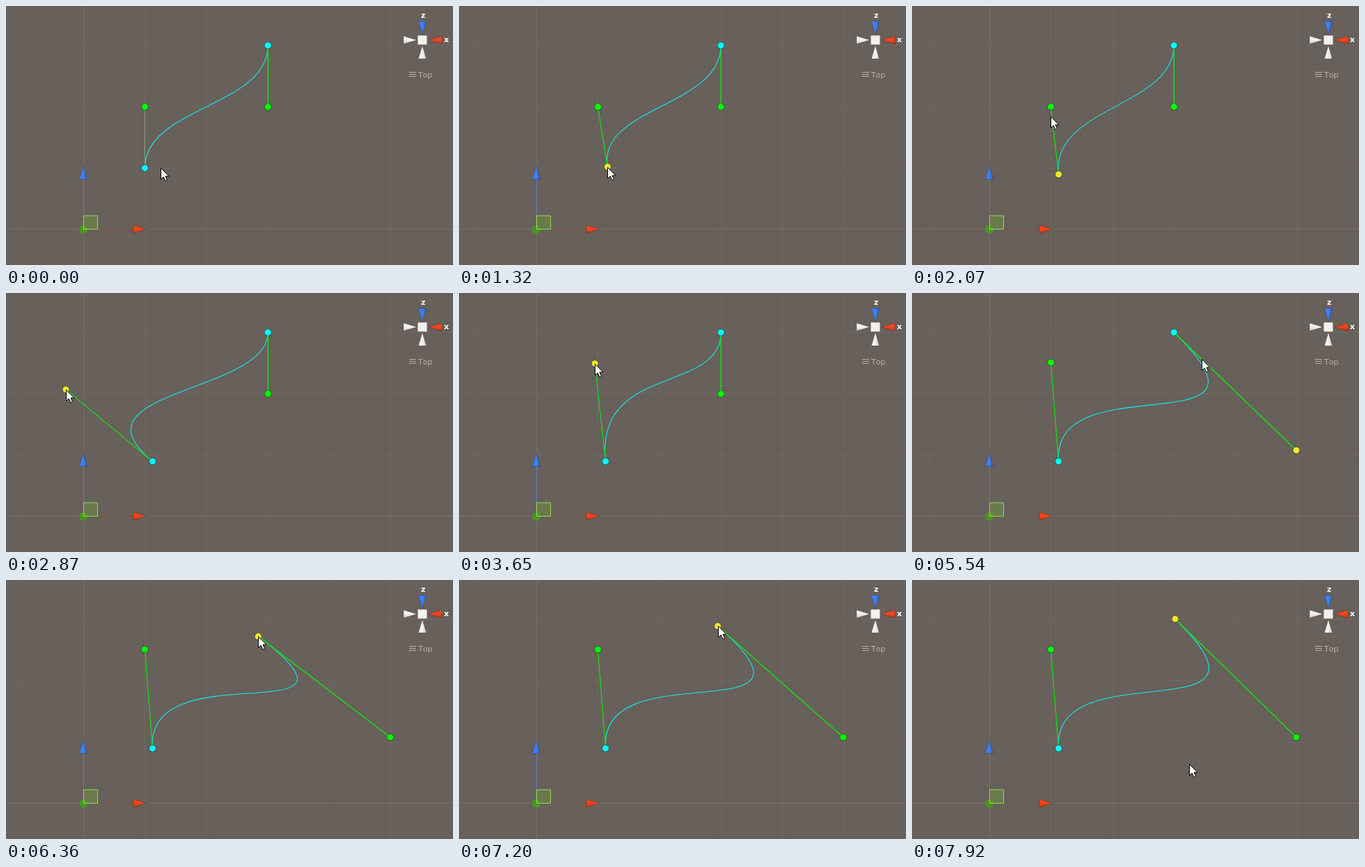
Recreate the animation shown at these times as an HTML page with a canvas. Size 642 by 373 pixels, loop 8 s.

```html
<!DOCTYPE html>
<html>
<head>
<meta charset="utf-8">
<style>
html, body { margin: 0; width: 100%; height: 100%; overflow: hidden; background: #68605a; }
canvas { display: block; }
</style>
</head>
<body>
<canvas id="stage" width="642" height="373"></canvas>
<script>
const ctx = document.getElementById('stage').getContext('2d');
const LOOP = 8000, STEP = 72, CELL = 88.4, ORIGIN = [111, 321];
const SANS = '"DejaVu Sans", sans-serif';

// The pointer travels to each place in turn, dragging a point where one is named
const moves = [
  { start: 60, end: 330, to: [201, 234] },
  { start: 560, end: 780, to: [215, 225], drag: 'a' },
  { start: 1320, end: 1700, to: [210.5, 242.5], drag: 'a' },
  { start: 1850, end: 2290, to: [198, 149] },
  { start: 2450, end: 2870, to: [86, 139], drag: 'aHandle' },
  { start: 3350, end: 3780, to: [199.5, 100], drag: 'aHandle' },
  { start: 3860, end: 4150, to: [344, 129] },
  { start: 4230, end: 4450, to: [361, 136] },
  { start: 4590, end: 5110, to: [552, 226.5], drag: 'bHandle' },
  { start: 5180, end: 5340, to: [483, 171] },
  { start: 5400, end: 5980, to: [380, 55] },
  { start: 6140, end: 6640, to: [359.5, 86], drag: 'b' },
  { start: 7120, end: 7480, to: [378, 56], drag: 'b' },
  { start: 7640, end: 7920, to: [398, 265] }
];

const easeOut = p => 1 - (1 - p) ** 2.6;

// Share of a move done at time t, in whole steps
function stepped(t, start, end) {
  const gaps = Math.round((end - start) / STEP);
  const done = Math.floor((t - start) / (end - start) * gaps + 0.15) + 1;
  return Math.min(1, done / (gaps + 1));
}

function stateAt(t) {
  const s = {
    a: [199.5, 233.3], aHandle: [199.5, 145.2],
    bHandle: [376.3, 145.2], b: [376.2, 56.8],
    cursor: [222, 233], picked: null
  };
  for (const { start, end, to, drag } of moves) {
    if (t < start) break;
    const k = easeOut(stepped(t, start, end));
    s.cursor = s[drag || 'cursor'].map((v, i) => v + (to[i] - v) * k);
    if (drag) {
      s[drag] = s.cursor;
      s.picked = drag;
    }
  }
  return s;
}

function line(a, b, color, width = 1) {
  ctx.strokeStyle = color;
  ctx.lineWidth = width;
  ctx.beginPath();
  ctx.moveTo(...a);
  ctx.lineTo(...b);
  ctx.stroke();
}

function poly(pts, fill, stroke, width = 1) {
  ctx.beginPath();
  pts.forEach(p => ctx.lineTo(...p));
  ctx.closePath();
  ctx.fillStyle = fill;
  ctx.fill();
  ctx.strokeStyle = stroke;
  ctx.lineWidth = width;
  ctx.stroke();
}

// Cone with its tip at (x, y), opening along (dx, dy), shaded to one side
function cone(x, y, dx, dy, light, dark) {
  const len = Math.hypot(dx, dy), half = 5.7;
  const nx = Math.abs(dy) / len * half, ny = Math.abs(dx) / len * half;
  const left = [x + dx - nx, y + dy - ny], right = [x + dx + nx, y + dy + ny];
  const shade = ctx.createLinearGradient(...left, ...right);
  shade.addColorStop(0.5, light);
  shade.addColorStop(1, dark);
  poly([[x, y], left, right], shade, 'rgba(40,30,30,.4)', 0.7);
}

function dot([x, y], r, fill) {
  ctx.beginPath();
  ctx.arc(x, y, r, 0, Math.PI * 2);
  ctx.fillStyle = fill;
  ctx.fill();
}

function text(s, x, y, font, color) {
  ctx.font = font;
  ctx.fillStyle = color;
  ctx.fillText(s, x, y);
}

function drawScene() {
  const [ox, oy] = ORIGIN;
  ctx.fillStyle = '#68605a';
  ctx.fillRect(0, 0, 642, 373);
  for (let i = -1; i < 6; i++) {
    const color = i ? '#6f6862' : '#77706a';
    const x = Math.round(ox + i * CELL) + 0.5, y = Math.round(oy - i * CELL) + 0.5;
    line([x, 0], [x, 373], color);
    line([0, y], [642, y], color);
  }

  // Move handle at the origin
  line([ox + 0.5, 249], [ox + 0.5, oy], '#5580d8');
  line([ox, oy + 0.5], [183, oy + 0.5], '#80503f');
  dot([ox, oy + 1], 6, '#4b951f');
  poly([[111.5, 302], [131.5, 302], [131.5, 321.5], [111.5, 321.5]],
    'rgba(110,170,50,.35)', '#8fdc55');
  cone(111, 231, 0, 18.5, '#3f80f2', '#2f61bd');
  cone(201.5, 321.5, -18.5, 0, '#f2451f', '#c13518');
}

function drawCompass() {
  cone(598, 41, 0, -19, '#3f80f2', '#2e66cc');
  cone(607, 49, 19, 0, '#f2451f', '#c13518');
  cone(590, 49, -19, 0, '#f3f2f1', '#c9c7c5');
  cone(598, 57, 0, 19, '#f3f2f1', '#cdcbc9');
  ctx.fillStyle = '#f3f1ef';
  ctx.fillRect(591.5, 42.5, 13, 13);
  text('z', 596, 17, 'bold 11px ' + SANS, '#fff');
  text('x', 629, 52, 'bold 11px ' + SANS, '#fff');
  for (let y = 95.5; y < 102; y += 3) line([579, y], [589, y], '#b5b1ae');
  ctx.fontKerning = 'none';
  text('Top', 592, 103, '11px ' + SANS, '#b9b5b2');
}

function drawCursor([x, y]) {
  const shape = [[0, 0], [0, 16], [3.7, 12.6], [6.4, 18.4], [9, 17.2], [6.5, 11.6], [11.4, 11.6]];
  poly(shape.map(([dx, dy]) => [x + 0.5 + dx, y + 0.5 + dy]), '#fff', '#000');
}

function draw(t) {
  const s = stateAt(t);
  drawScene();

  ctx.strokeStyle = '#10ecec';
  ctx.lineWidth = 1.1;
  ctx.beginPath();
  ctx.moveTo(...s.a);
  ctx.bezierCurveTo(...s.aHandle, ...s.bHandle, ...s.b);
  ctx.stroke();

  line(s.a, s.aHandle, s.picked ? '#14dc14' : '#86a07c', s.picked ? 1.3 : 1);
  line(s.b, s.bHandle, '#0de60d', 1.5);

  for (const name of ['a', 'aHandle', 'bHandle', 'b']) {
    const color = name.length > 1 ? '#00fa00' : '#00fcfc';
    dot(s[name], 5.2, 'rgba(20,40,30,.65)');
    dot(s[name], 4.6, name === s.picked ? '#f0e829' : color);
  }

  drawCompass();
  drawCursor(s.cursor.map(Math.round));
}

function frame(now) {
  draw(now % LOOP);
  requestAnimationFrame(frame);
}
requestAnimationFrame(frame);
</script>
</body>
</html>
```
